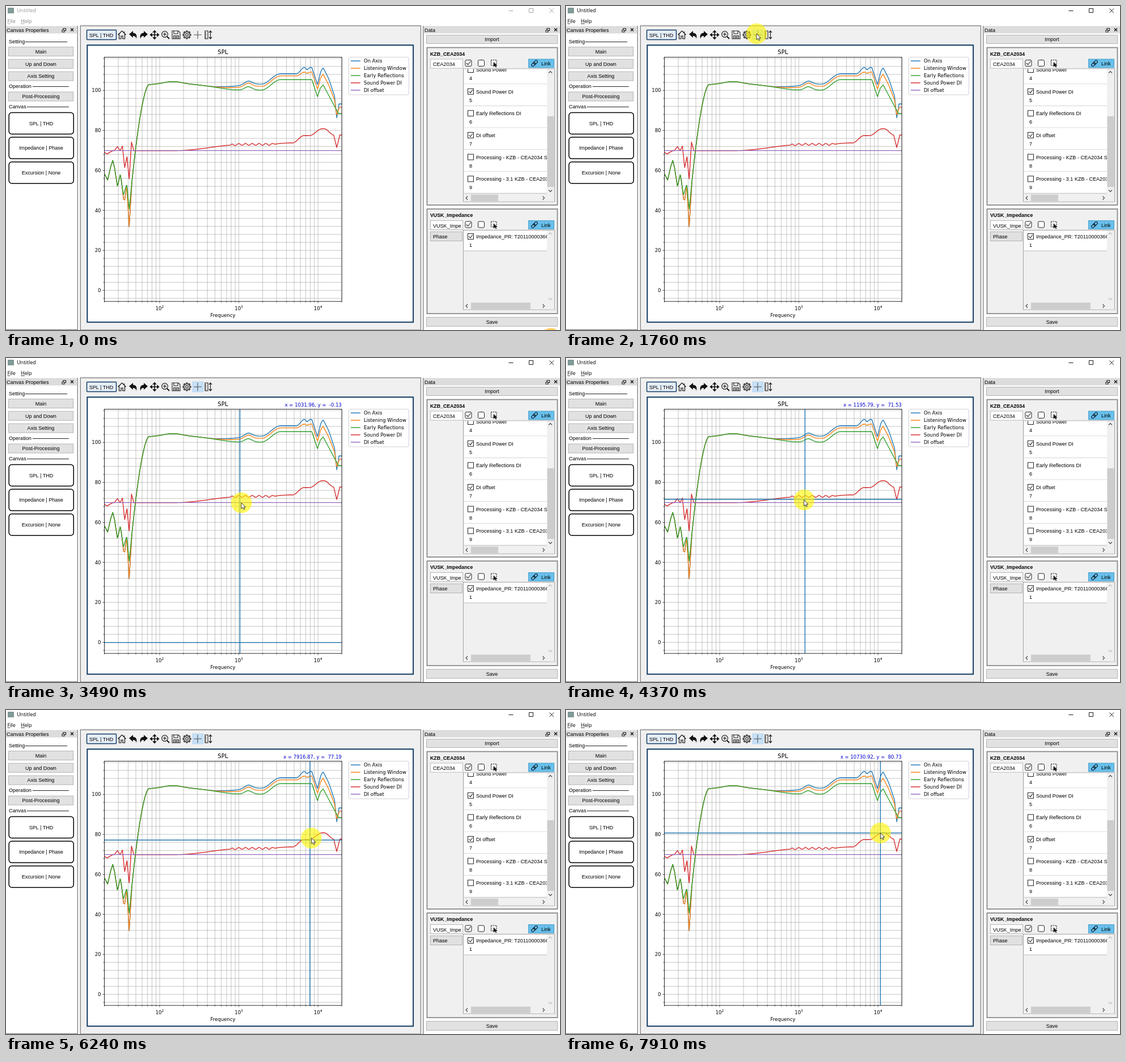
Animation of 977 by 573 pixels, one loop 8 s. Source, as an HTML page:

```html
<!DOCTYPE html>
<html lang="en">
<head>
<meta charset="utf-8">
<title>Untitled</title>
<style>
html, body { margin: 0; width: 100%; height: 100%; overflow: hidden; background: #fff; }
svg { display: block; }
text { font: 9.05px "Liberation Sans", Arial, sans-serif; white-space: pre; }
.bold { font-weight: bold; font-size: 8.8px; }
.sys { font: 9.1px "Open Sans", sans-serif; }
.plot { font: 8.5px "DejaVu Sans", sans-serif; }
.heading { font-size: 10.2px; }
</style>
</head>
<body>
<svg id="stage" width="100%" height="100%" viewBox="0 0 977 573"></svg>
<script>
const LOOP = 8000;
const BLUE = '#1f77b4', ORANGE = '#ff7f0e', GREEN = '#2ca02c', RED = '#d62728', PURPLE = '#9467bd';
const NAVY = '#123c63', FRAME = '#8a8a8a', FACE = '#f0f0f0', INK = '#222';

// Plot area, and data to pixels and back
const AX = { l: 173.5, r: 592.2, t: 90.5, b: 522.3 };
const px = f => 271 + 139.6 * Math.log10(f / 100);
const py = v => 502.9 - 3.536 * v;
const freqAt = x => 100 * 10 ** ((x - 271) / 139.6);
const levelAt = y => (502.9 - y) / 3.536;

// Markup helpers
const rect = (x, y, w, h, fill = '#fff', stroke = 'none', sw = 1, r = 0, extra = '') =>
  `<rect x="${x}" y="${y}" width="${w}" height="${h}" rx="${r}" fill="${fill}" stroke="${stroke}" stroke-width="${sw}" ${extra}/>`;
const path = (d, stroke = '#111', sw = 1, fill = 'none', extra = '') =>
  `<path d="${d}" stroke="${stroke}" stroke-width="${sw}" fill="${fill}" ${extra}/>`;
const ring = (r, fill = 'none') => `<circle r="${r}" fill="${fill}" stroke="${INK}" stroke-width="1.2"/>`;
const text = (x, y, s, cls = '', anchor = 'start', fill = '#000', extra = '') =>
  `<text x="${x}" y="${y}" class="${cls}" text-anchor="${anchor}" fill="${fill}" ${extra}>${s}</text>`;
const mid = (x, y, s, cls = '') => text(x, y, s, cls, 'middle');
const clip = (x, y, w, h, body) =>
  `<svg x="${x}" y="${y}" width="${w}" height="${h}" viewBox="${x} ${y} ${w} ${h}" overflow="hidden">${body}</svg>`;
const at = (x, y, body) => `<g transform="translate(${x} ${y})">${body}</g>`;
const spin = (n, d, sw, fill) => Array.from({ length: n }, (_, i) =>
  path(d, '#111', sw, fill, `transform="rotate(${i * 360 / n})"`)).join('');

// Widgets
const panel = (x, y, w, h) => rect(x + .5, y + .5, w - 1, h - 1, '#e1e1e1', '#b4b4b4');
const button = (x, y, w, h, s) => panel(x, y, w, h) + mid(x + w / 2, y + h / 2 + 3.3, s);
const check = (x, y, on, size = 10, r = 0) =>
  rect(x, y, size, size, '#fff', INK, 1, r) +
  (on ? path(`M${x + 2} ${y + size / 2}l${size * .25} ${size * .25}L${x + size - 1.5} ${y + 2}`, INK, 1.1) : '');
const header = (x, w, s) =>
  rect(x, 35.5, w, 13, '#dcdcdc') + text(x + 1, 45.6, s) +
  path(`M${x + w - 26} 42.5h4v3.5h-4zM${x + w - 24} 42.5v-3h4.5v4h-2`, INK, 1.1) +
  path(`M${x + w - 11} 39.5l5 5m0-5l-5 5`, '#111', 1.3);
const chevron = (x, y, angle, color) =>
  path('M-1.5 -3L1.5 0L-1.5 3', color, 1.1, 'none', `transform="translate(${x} ${y}) rotate(${angle})"`);

function titleBar() {
  const label = (x, y, s) => text(x, y, s, 'sys', 'start', 'currentColor');
  return rect(3, 3, 11, 10, '#7f9a97') +
    `<g id="title">${label(19, 11, 'Untitled')}` +
    path('M886.5 8.5h8M922.5 4.5h7v7h-7zM958.5 4.5l7.5 7.5m0-7.5l-7.5 7.5', 'currentColor', .9) + '</g>' +
    `<g id="menu">${label(2.5, 30, 'File')}${label(26, 30, 'Help')}` +
    path('M2.5 31.5h5M26 31.5h7', 'currentColor', .7) + '</g>';
}

function leftPanel() {
  const section = (y, s, x, w) => text(5, y, s) + path(`M${x} ${y - 2.5}h${w}`, INK);
  const cards = ['SPL | THD', 'Impedance | Phase', 'Excursion | None'].map((s, i) => {
    const y = 188.5 + 43.6 * i;
    return rect(5.2, y, 114, 38, '#fff', '#000', 1.5, 5) + mid(62, y + 22.3, s);
  }).join('');
  const settings = ['Main', 'Up and Down', 'Axis Setting'].map((s, i) => button(4, 72 + 21.8 * i, 115, 17, s)).join('');
  return header(0, 125, 'Canvas Properties') + path('M126.3 35V572.5H0', FRAME, 1.5) +
    section(66, 'Setting', 34, 74) + settings +
    section(145, 'Operation', 47, 64) + button(4, 151.5, 115, 17, 'Post-Processing') +
    section(181, 'Canvas', 37, 74) + cards;
}

function toolbar() {
  const undo = path('M-7 -1L0 -7V-3.5C5 -3.5 7.5 0 6 7C5 3 3 2 0 2V5Z', 'none', 0, '#111');
  return rect(142.5, 42.5, 52, 17, '#e5eef7', NAVY, 1.5, 1) + mid(168, 54.6, 'SPL | THD') +
    at(204.5, 51, path('M-7 0L0 -7L7 0M-5 -1.5V7H-1.5V2H1.5V7H5V-1.5M4 -6V-3', '#111', 1.2)) +
    at(224, 51, undo) + at(243, 51, `<g transform="scale(-1 1)">${undo}</g>`) +
    at(262, 51, spin(4, 'M0 0V-5H-2L0 -7.3L2 -5H0', 1.6, '#111')) +
    at(280, 50, ring(5.3) + path('M-3 0H3M0 -3V3', '#111', 1.2) + path('M4 4L8 8', '#111', 2)) +
    at(300, 51, path('M-7 -7H4L7 -4V7H-7ZM-4 -7V-2H3V-7M-4.5 7V1.5H4.5V7M-3 3.5H3M-3 5.5H3', INK, 1.1)) +
    at(319, 51, spin(8, 'M-1.3 -5.2L-1 -7H1L1.3 -5.2', 1.1, '#fff') + ring(5.2, FACE) + ring(2.3)) +
    rect(329, 42, 19, 18, '#c6e0f5', '#a9cfee', .7, 0, 'id="toggle"') +
    path('M331 51H345M338 44V58', '#555', 1.1) +
    at(357, 51, path('M-6 -7H-1V7H-6ZM-6 -4H-4M-6 -1H-3.5M-6 2H-4M-6 5H-3.5', INK, 1.1) +
      path('M3.5 -6V6M1 -4L3.5 -7L6 -4M1 4L3.5 7L6 4', INK, 1.2));
}

function grid() {
  let lines = '', ticks = '', labels = '';
  for (let e = 1; e <= 4; e++)
    for (let k = 1; k < 10; k++) {
      const f = k * 10 ** e;
      if (f < 20 || f > 20000) continue;
      lines += `M${px(f)} ${AX.t}V${AX.b}`;
      ticks += `M${px(f)} ${AX.b}v${k === 1 ? 3 : 2}`;
      if (k === 1) labels += mid(px(f), 537.5, `10<tspan dy="-3.2" font-size="6">${e}</tspan>`, 'plot');
    }
  for (let v = -4; v <= 116; v += 4) {
    const major = v % 20 === 0;
    lines += `M${AX.l} ${py(v)}H${AX.r}`;
    ticks += `M${AX.l} ${py(v)}h${major ? -3 : -2}`;
    if (major) labels += text(167.5, py(v) + 3.1, v, 'plot', 'end');
  }
  return path(lines, '#b0b0b0', .75) + path(ticks, '#000', .7) + labels;
}

// Curve shapes, in pixels
const clamp = u => Math.min(1, Math.max(0, u));
const ramp = (x, a, b) => { const u = clamp((x - a) / (b - a)); return u * u * (3 - 2 * u); };
const tent = (x, c, w) => Math.max(0, 1 - Math.abs(x - c) / w);
const bump = (x, c, w) => Math.exp(-(((x - c) / w) ** 2));

function reflections(x) {
  if (x < 217)
    return 298 + .5 * (x - 174) + 7 * tent(x, 179, 5) - 32 * tent(x, 188, 9) + 12 * tent(x, 196, 5) -
      13 * tent(x, 201, 5) + 19 * tent(x, 207, 5) + 40 * tent(x, 217, 4);
  const rollOff = 220 * (1 - clamp((x - 217) / 35)) ** 1.7;
  return 139 + rollOff - 5.5 * bump(x, 294, 25) + 9.5 * ramp(x, 325, 415) - 6 * bump(x, 427, 9) -
    18.5 * ramp(x, 450, 484) + 30 * tent(x, 549, 10) + 60 * clamp((x - 554) / 32);
}

// How far the on-axis response lies above the reflections
const spread = x => 10.5 * ramp(x, 350, 440) + 11 * ramp(x, 512, 526) - 4 * tent(x, 531, 5) +
  8.5 * ramp(x, 549, 558) - 13 * ramp(x, 566, 582) - 30 * tent(x, 583, 4);
const notches = x => 16 * tent(x, 209, 4) + 31 * tent(x, 217, 5);
const direct = k => x => reflections(x) + notches(x) - k * spread(x);

function powerIndex(x) {
  const ripple = (ramp(x, 390, 400) - ramp(x, 465, 480)) * -1.6 * Math.cos((x - 434) / 1.9);
  const low = 6 * tent(x, 178, 10) - 7 * tent(x, 196, 5) - 8 * tent(x, 205, 4) + 30 * tent(x, 209, 4) +
    11 * tent(x, 213, 4) + 50 * tent(x, 217, 4) - 15 * tent(x, 221, 4);
  return 255.5 + low + ripple - 11 * ramp(x, 300, 420) - 2.5 * ramp(x, 460, 500) - 13 * ramp(x, 505, 525) -
    12 * ramp(x, 535, 557) + 11 * ramp(x, 561, 578) + 22 * tent(x, 583, 5.5);
}

const SERIES = [
  ['On Axis', BLUE, direct(1)], ['Listening Window', ORANGE, direct(.62)], ['Early Reflections', GREEN, reflections],
  ['Sound Power DI', RED, powerIndex], ['DI offset', PURPLE, () => py(70)]
];

function trace(fn) {
  let d = '';
  for (let x = 173; x <= 593; x += .5) d += `${d ? 'L' : 'M'}${x + .3} ${(fn(x) + .2).toFixed(2)}`;
  return d;
}

function chart() {
  const curves = SERIES.map(([, color, fn]) => path(trace(fn), color, 1.35, 'none', 'stroke-linejoin="round"')).join('');
  const legend = rect(604.5, 90.5, 106, 66.5, '#fff', '#ccc', .9, 2) + SERIES.map(([name, color], i) => {
    const y = 97.2 + 12.9 * i;
    return path(`M608 ${y}h17`, color, 1.4) + text(631, y + 3, name, 'plot');
  }).join('');
  return rect(131.2, 35, 600.3, 538, FACE, FRAME, 1.5) + toolbar() +
    rect(143.3, 69.2, 574.9, 490, '#fff', NAVY, 2) +
    mid(382.5, 84.5, 'SPL', 'plot heading') + mid(382.5, 549.5, 'Frequency', 'plot') + grid() +
    clip(AX.l, AX.t, AX.r - AX.l, AX.b - AX.t, curves) +
    `<g id="cross">${path('', BLUE, 1.4, 'none', 'id="hair"')}` +
    text(592, 85.5, '', 'plot', 'end', '#0000cd', 'id="readout"') + '</g>' +
    rect(AX.l, AX.t, AX.r - AX.l, AX.b - AX.t, 'none', '#000', .8) + legend;
}

function group(y, h, name, field, body) {
  const row = y + 28;
  return rect(742.5, y, 230, h, FACE, FRAME, 1.8) + text(748, y + 14, name, 'bold') +
    rect(748.5, row - 7.5, 57, 16, '#fff', '#aaa', .8) + clip(749, row - 8, 54, 18, text(753, row + 4.5, field)) +
    check(810, row - 6, true, 11, 2) + check(832.5, row - 6, false, 11, 2) +
    rect(855.5, row - 6, 9.5, 9.5, 'none', INK, 1.1, 0, 'stroke-dasharray="2.2 1.3"') +
    path(`M860 ${row - 2}v8l2-2l2 3l1-.6l-1.6-2.8h2.6z`, '#111', .5, '#111') +
    rect(921.5, row - 7.5, 45, 15, '#68c0ec', '#4c9fcb') + text(944, row + 3.5, 'Link') +
    `<g transform="translate(932 ${row}) rotate(-45)">` +
    rect(-6.5, -2.3, 7.5, 4.6, 'none', '#123', 1.2, 2.3) + rect(-1, -2.3, 7.5, 4.6, 'none', '#123', 1.2, 2.3) + '</g>' + body;
}

function listBox(y, bottom, thumbW, first, items, offset) {
  const rows = items.map(([s, on], i) => {
    const b = y + offset + 38.65 * i;
    return rect(808, b - 16.6, 146, 38.6) + check(814.5, b - 8.5, on) + text(829, b, s) + text(817, b + 15, first + i) +
      path(`M808 ${b + 22}H954`, '#b5b5b5', .9);
  }).join('');
  const scrolls = items.length > 1, arrow = scrolls ? '#444' : '#bbb';
  return rect(806.5, y, 161, bottom - y, FACE, '#999', .9) +
    clip(808, y + .5, 146, bottom - y - 13, rows) +
    rect(954, y + .5, 13, bottom - y - 1, FACE) + rect(807, bottom - 13, 160, 12.5, FACE) +
    (scrolls ? rect(954.5, 195, 12, 125, '#cdcdcd') : '') + rect(820, bottom - 12.5, thumbW, 12, '#cdcdcd') +
    chevron(960, y + 6, -90, arrow) + chevron(960, bottom - 19, 90, arrow) +
    chevron(812.5, bottom - 6.5, 180, '#444') + chevron(948, bottom - 6.5, 0, '#444');
}

function rightPanel() {
  const sets = [['Sound Power', false], ['Sound Power DI', true], ['Early Reflections DI', false],
    ['DI offset', true], ['Processing - KZB - CEA2034 SPL', false], ['Processing - 3.1 KZB - CEA2034', false]];
  return path('M735.8 35V573', FRAME, 1.5) + header(737, 241, 'Data') + button(741, 51, 232, 16, 'Import') +
    group(73.5, 278.5, 'KZB_CEA2034', 'CEA2034', listBox(111, 346, 48, 4, sets, 5)) +
    group(359, 185, 'VUSK_Impedance', 'VUSK_Impedance', panel(748, 399, 57, 17) + text(753, 410.5, 'Phase') +
      listBox(396.5, 537, 105, 1, [['Impedance_PR: T20110000366', true]], 14.5)) +
    button(741, 550, 232, 17, 'Save');
}

const stage = document.getElementById('stage');
stage.innerHTML = rect(0, 0, 977, 573) + titleBar() + leftPanel() + chart() + rightPanel() +
  '<circle id="halo" r="18.3" fill-opacity=".62"/>' +
  path('M0 0V10.5L2.5 8.3L4.2 12L5.9 11.2L4.3 7.6H7.5Z', '#111', .8, '#fff', 'id="pointer"');
const $ = id => document.getElementById(id);
const set = (id, attrs) => Object.entries(attrs).forEach(([k, v]) => $(id).setAttribute(k, v));

// Pointer moves: start, end, target; the pointer rests in between
const HOME = [961, 588];
const MOVES = [
  [120, 250, 470, 267], [430, 850, 357, 53], [850, 1220, 336, 49],
  [2290, 2490, 404, 132], [2490, 2750, 431, 255], [3000, 3490, 415, 256],
  [3960, 4200, px(1250), py(72)], [4200, 4630, px(1035), py(70)],
  [5000, 5180, px(4309.36), py(100.9)], [5180, 5250, 526, 191], [5250, 5780, 536, 230],
  [6170, 6510, px(9795.23), py(82.47)], [7040, 7580, px(10730.92), py(80.73)]
];
const SHOWN = 2080, GRABBED = 3960, HAIR_LAG = 70, HALO_LAG = 9;

function pointer(t) {
  let [x, y] = HOME;
  for (const [a, b, tx, ty] of MOVES) {
    const u = clamp((t - a) / (b - a));
    x += (tx - x) * u;
    y += (ty - y) * u;
  }
  return [x, y];
}

function draw(t) {
  const [x, y] = pointer(t), [cx, cy] = pointer(t - HALO_LAG);
  const pressed = t < 120 || (t >= 1270 && t < 1550);
  set('pointer', { transform: `translate(${x} ${y})` });
  set('halo', { cx, cy, fill: pressed ? '#ffb000' : '#fff600' });
  set('title', { color: t < 1550 ? '#999' : '#000' });
  set('menu', { color: t < 1760 ? '#888' : '#000' });
  set('toggle', { visibility: t < 1620 ? 'hidden' : 'visible' });
  set('cross', { visibility: t < SHOWN ? 'hidden' : 'visible' });
  const [hx, hy] = t < GRABBED ? [px(1031.96), py(-.13)] : pointer(t - HAIR_LAG);
  set('hair', { d: `M${hx} ${AX.t}V${AX.b}M${AX.l} ${hy}H${AX.r}` });
  $('readout').textContent = `x = ${freqAt(hx).toFixed(2)}, y = ${levelAt(hy).toFixed(2).padStart(6)}`;
}

const start = performance.now();
function tick() {
  draw((performance.now() - start) % LOOP);
  requestAnimationFrame(tick);
}
tick();
</script>
</body>
</html>
```
